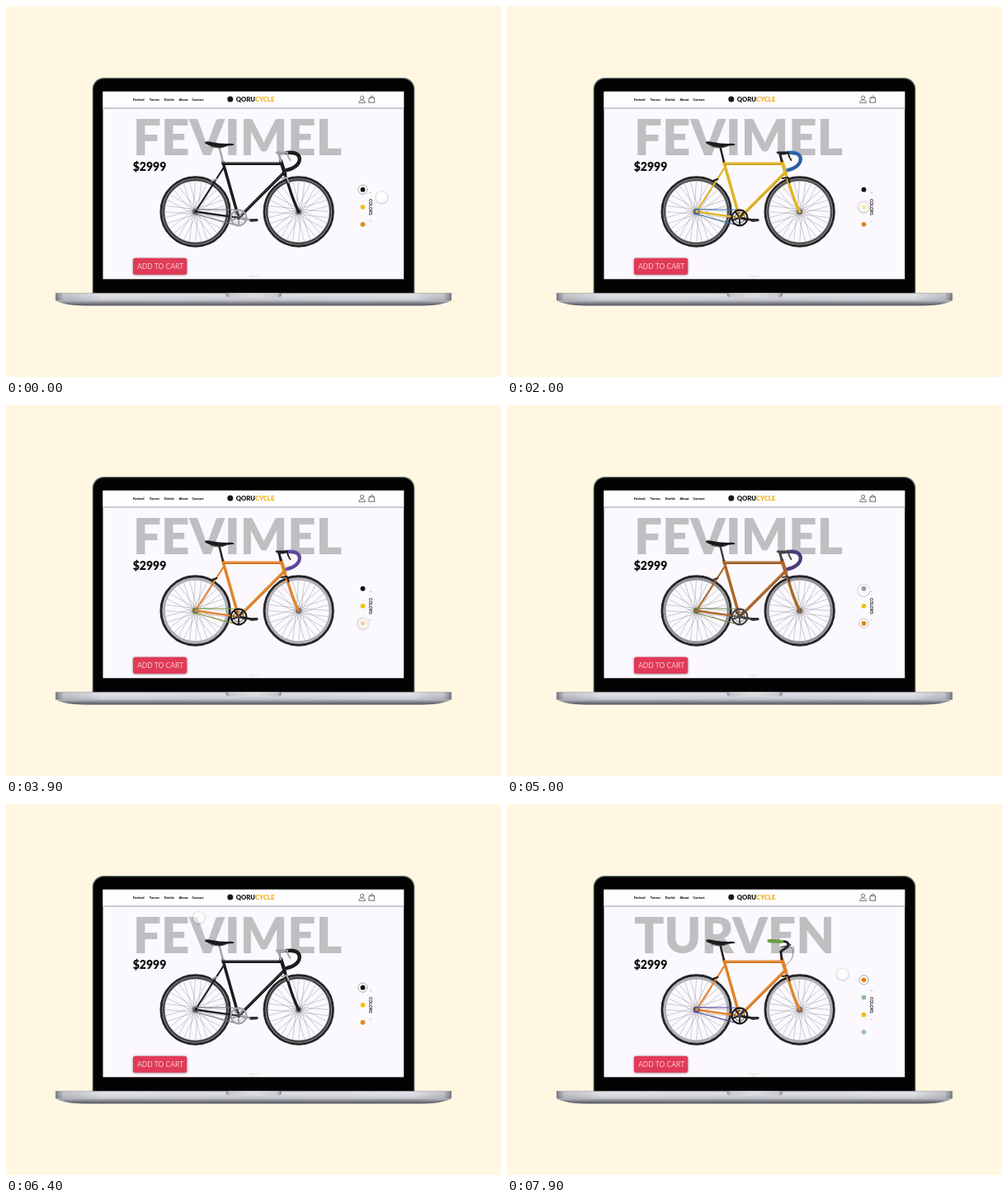
An HTML page with a canvas that plays this animation: 600x450 px, repeating every 8000 ms.

```html
<!DOCTYPE html>
<html lang="en">
<head>
<meta charset="utf-8">
<title>Bike shop</title>
<style>
  html, body { margin: 0; width: 100%; height: 100%; overflow: hidden; background: #fff7e1; }
  canvas { display: block; width: 600px; height: 450px; }
</style>
</head>
<body>
<canvas id="stage"></canvas>
<script>
const W = 600, H = 450, LOOP = 8000, TAU = Math.PI * 2;
const SCALE = Math.max(1, window.devicePixelRatio || 1);
const FONT = 'Lato, sans-serif';

function prepare(canvas) {
  canvas.width = W * SCALE;
  canvas.height = H * SCALE;
  const c = canvas.getContext('2d');
  c.scale(SCALE, SCALE);
  c.lineCap = c.lineJoin = 'round';
  return c;
}
const ctx = prepare(document.getElementById('stage'));

const FEVIMEL_DOTS = [['#111', 222.7], ['#f2c114', 243.8], ['#df8a20', 264.8]];
const TURVEN_DOTS = [['#ee7f1c', 213.3], ['#91bd9b', 234.6], ['#e9c02c', 255.7], ['#93bfd6', 276.6]];
const pages = [
  { title: 'FEVIMEL', dots: FEVIMEL_DOTS, pick: 0, frame: '#1c1c1f', tape: '#1c1c1f', chain: '#77777b', metal: '#a2a2a6', rim: '#3a3a3d' },
  { title: 'FEVIMEL', dots: FEVIMEL_DOTS, pick: 1, frame: '#e2b423', tape: '#3a7fd0', chain: '#3d70ae', metal: '#1f1f21', rim: '#4a4a4d' },
  { title: 'FEVIMEL', dots: FEVIMEL_DOTS, pick: 2, frame: '#e4832a', tape: '#7a5fbd', chain: '#7f9638', metal: '#1f1f21', rim: '#b4b4b8' },
  { title: 'TURVEN', dots: TURVEN_DOTS, pick: 0, frame: '#e4832a', tape: '#78a848', chain: '#514a9a', metal: '#1f1f21', rim: '#b4b4b8', flat: true }
];

function text(c, str, x, y, size, weight, color) {
  c.font = `${weight} ${size}px ${FONT}`;
  c.fillStyle = color;
  c.fillText(str, x, y);
}
function line(c, color, width, ...p) {
  c.strokeStyle = color;
  c.lineWidth = width;
  c.beginPath();
  c.moveTo(p[0], p[1]);
  for (let i = 2; i < p.length; i += 2) c.lineTo(p[i], p[i + 1]);
  c.stroke();
}
function path(c, color, width, d) {
  c.strokeStyle = color;
  c.lineWidth = width;
  c.stroke(new Path2D(d));
}
function disc(c, x, y, r, color) {
  c.fillStyle = color;
  c.beginPath();
  c.arc(x, y, r, 0, TAU);
  c.fill();
}
function ring(c, x, y, r, color, width) {
  c.strokeStyle = color;
  c.lineWidth = width;
  c.beginPath();
  c.arc(x, y, r, 0, TAU);
  c.stroke();
}
function box(c, x, y, w, h, r, color) {
  c.fillStyle = color;
  c.beginPath();
  c.roundRect(x, y, w, h, r);
  c.fill();
}
function gradient(c, x0, y0, x1, y1, ...stops) {
  const g = c.createLinearGradient(x0, y0, x1, y1);
  stops.forEach(([at, color]) => g.addColorStop(at, color));
  return g;
}

function laptop(c) {
  c.fillStyle = '#fff7e1';
  c.fillRect(0, 0, W, H);
  box(c, 104.7, 87, 390.6, 264, [14, 14, 2, 2], '#5f6f66');
  box(c, 105.8, 88.2, 388.4, 263, [13, 13, 2, 2], '#030303');

  c.fillStyle = gradient(c, 0, 348, 0, 363.7, [0, '#d6d7dc'], [.2, '#d9dadf'], [.5, '#c6c7ce'], [.64, '#aeb0b8'], [.76, '#858791'], [.92, '#62646e'], [1, '#555761']);
  c.fill(new Path2D('M60 348.2H540V357Q530 363 505 363.6H95Q70 363 60 357Z'));
  c.fillStyle = gradient(c, 60, 0, 540, 0, [0, 'rgba(70,72,82,.65)'], [.02, 'rgba(70,72,82,.15)'], [.12, 'rgba(255,255,255,.2)'],
    [.5, 'rgba(255,255,255,.05)'], [.9, 'rgba(255,255,255,.2)'], [.98, 'rgba(70,72,82,.15)'], [1, 'rgba(70,72,82,.65)']);
  c.fillRect(60, 348.2, 480, 9);
  line(c, '#8a8c94', .5, 60, 348.3, 540, 348.3);
  box(c, 266.5, 348.3, 67.5, 5.2, [0, 0, 4, 4],
    gradient(c, 266, 0, 334, 0, [0, '#85868e'], [.08, '#c9c9cf'], [.5, '#dedee2'], [.92, '#c9c9cf'], [1, '#85868e']));
}

function header(c) {
  c.fillStyle = '#fefdff';
  c.fillRect(117.5, 103.8, 364.7, 19.7);
  c.fillStyle = gradient(c, 0, 123.3, 0, 125.3, [0, '#b4b3b7'], [.5, '#bdbcc0'], [1, '#fbf9fd']);
  c.fillRect(117.5, 123.3, 364.7, 2);
  [['Fevimel', 154], ['Turven', 173.7], ['Dorlak', 191.8], ['About', 209.6], ['Contact', 225.6]]
    .forEach(([label, x]) => text(c, label, x, 114.6, 3.9, 900, '#111'));

  disc(c, 271.8, 113, 3.5, '#17171a');
  text(c, 'QORU', 278.7, 116.2, 7.7, 900, '#111');
  text(c, 'CYCLE', 278.7 + c.measureText('QORU').width, 116.2, 7.7, 900, '#f0ae1c');

  ring(c, 431.6, 111.2, 2.1, '#444', .7);
  path(c, '#444', .7, 'M427.7 117C427.7 112.8 435.5 112.8 435.5 117Z');
  path(c, '#444', .8, 'M440.6 111.3H446.3L446.8 117.1H440.1ZM441.8 111.2C441.8 108.3 445.1 108.3 445.1 111.2');
}

function wheel(c, x, y, rim) {
  for (let i = 0; i < 32; i++) {
    const a = i * TAU / 32, hub = a + (i % 2 ? 1.3 : -1.3);
    line(c, 'rgba(85,85,92,.68)', .42, x + 3 * Math.cos(hub), y + 3 * Math.sin(hub), x + 37 * Math.cos(a), y + 37 * Math.sin(a));
  }
  ring(c, x, y, 38.7, rim, 2.5);
  ring(c, x, y, 40, '#a9a9ad', .6);
  ring(c, x, y, 41.7, '#252527', 2.9);
  ring(c, x, y, 37.4, '#77777b', .5);
  disc(c, x, y, 3, '#55555a');
  disc(c, x, y, 1.3, '#c6c6ca');
}

function handlebar(c, b) {
  if (b.flat) {
    path(c, '#1f1f21', 2.8, 'M333 188L331.8 179L341 172.5L340 168Q336 166 332 167');
    line(c, b.tape, 4.2, 317.5, 166, 333, 166.9);
    for (let x = 318; x < 333; x += 2.5) line(c, '#3f6f27', .5, x, 164.4, x + .7, 168.3);
    path(c, '#2a2a2c', 1.1, 'M340 168L344 171L332 173.5');
    path(c, '#555', .7, 'M341 172C350 174 349 189 337 196');
    return;
  }
  path(c, b.metal, 3, 'M333 188L330.8 179L342 178.2');
  path(c, b.tape, 4.4, 'M340 178C349 176.8 355.6 179 355.8 185.5C356 192.5 347.5 198.2 340.2 199');
  if (b.tape !== b.frame) {
    c.setLineDash([.7, 2]);
    path(c, 'rgba(20,20,50,.3)', 3.6, 'M344 178C350 178 355.6 180 355.8 185.5C356 192.5 347.5 198.2 340.2 199');
    c.setLineDash([]);
  }
  path(c, b.metal, 1.9, 'M341 179Q341.5 183 344.5 187');
  line(c, b.metal, 2.4, 328, 177.8, 341, 177.8);
}

function tube(c, color, width, ...p) {
  line(c, color, width, ...p);
  line(c, 'rgba(0,0,0,.2)', width * .25, ...p.map((v, i) => i % 2 ? v + width * .32 : v));
  line(c, 'rgba(255,255,255,.25)', width * .2, ...p.map((v, i) => i % 2 ? v - width * .2 : v));
}

function bike(c, b) {
  const rx = 229.6, fx = 354.7, y = 249.5, cx = 282, cy = 256.9;
  wheel(c, rx, y, b.rim);
  wheel(c, fx, y, b.rim);

  line(c, b.frame, 2.1, 264.5, 195, rx, y);
  line(c, b.frame, 2.3, rx, y, cx, cy);
  path(c, b.frame, 3.3, 'M337.8 204C343 216 344 227 354.7 249.5');
  tube(c, b.frame, 3.6, 336, 203, cx, cy);
  line(c, b.frame, 3.5, 262.8, 189, cx, cy);
  tube(c, b.frame, 3.5, 263.2, 191.2, 333, 191.2);
  line(c, b.frame, 4.3, 333.2, 188, 338.2, 204);

  line(c, b.metal, 2.5, 258.7, 172, 262.8, 188.5);
  c.fillStyle = '#1c1c1f';
  c.fill(new Path2D('M241 165.3Q242.5 163.6 249 165Q260 167.3 272 166.8Q277 167 276.4 168.7Q268 169 260 172.2Q249 170.8 241.8 167Z'));
  path(c, '#4a4a4d', .9, 'M248 170.3Q258 174 267 170');

  path(c, b.metal, 2, 'M334 209L340.5 208L342.5 214M249.5 212L255.5 210');

  path(c, b.chain, 1.1, `M${rx} 246.5L${cx} 247.2M${rx} 252.5L${cx} 266.6`);
  ring(c, rx, y, 3.3, b.chain, 1.1);
  ring(c, cx, cy, 9.4, b.metal, 2.3);
  ring(c, cx, cy, 6.2, b.metal, .8);
  for (let i = 0; i < 5; i++) {
    const a = i * TAU / 5 + .3;
    line(c, b.metal, 1.9, cx, cy, cx + 8.8 * Math.cos(a), cy + 8.8 * Math.sin(a));
  }
  line(c, b.metal, 2.8, cx, cy, 300, 260.2);
  disc(c, cx, cy, 2.3, '#4b4b50');
  line(c, '#2b2b2e', 3.4, 297, 260, 304, 259.6);
  handlebar(c, b);
}

function swatches(c, page) {
  page.dots.forEach(([color, y], i) => {
    if (i === page.pick) {
      disc(c, 432.5, y, 6, '#fff');
      ring(c, 432.5, y, 5.6, '#8f8f92', .8);
    }
    disc(c, 432.5, y, 2.9, color);
  });
  c.save();
  c.translate(439.8, 234);
  c.rotate(Math.PI / 2);
  text(c, 'COLORS', 0, 0, 5, 700, '#222');
  c.restore();
  line(c, '#999', .6, 441.2, 226.5, 442.9, 226.5);
  line(c, '#999', .6, 441.2, 261, 442.9, 261);
}

function render(page) {
  const canvas = document.createElement('canvas');
  const c = prepare(canvas);
  laptop(c);
  c.fillStyle = '#fbf9fd';
  c.fillRect(117.5, 103.8, 364.7, 227.5);
  header(c);
  text(c, page.title, 154, 180.8, 60, 900, '#bfbec1');
  text(c, '$2999', 153.7, 200.3, 14, 900, '#0b0b0c');
  bike(c, page);
  swatches(c, page);

  c.shadowColor = 'rgba(60,20,30,.55)';
  c.shadowBlur = 3 * SCALE;
  c.shadowOffsetY = .4 * SCALE;
  box(c, 154, 305.8, 65.2, 20, 2.5, '#e03a57');
  c.shadowColor = 'transparent';
  text(c, 'ADD TO CART', 159, 318.8, 8.5, 400, '#f8c9d1');

  path(c, '#d2d0d5', .6, 'M294 327.5H305M297.5 329L299.5 330.5L301.5 329');
  return canvas;
}

// Cursor moves: start, end, destination
const moves = [
  [50, 700, 432.5, 243.7],
  [2250, 3000, 432.8, 265],
  [4050, 4800, 432.3, 224.7],
  [5900, 6700, 181.3, 115],
  [7450, 8000, 412.2, 208.7]
];
// Page dissolves: start, page index
const fades = [[1500, 1], [3150, 2], [4950, 0], [7200, 3]];
const FADE = 500;

const clamp = v => Math.min(1, Math.max(0, v));
const easeInOut = p => p < .5 ? 4 * p ** 3 : 1 - 4 * (1 - p) ** 3;
const easeOut = p => 1 - (1 - p) ** 3;

function drawCursor(t) {
  let x = 455.5, y = 232;
  for (const [from, to, tx, ty] of moves) {
    const p = easeInOut(clamp((t - from) / (to - from)));
    x += (tx - x) * p;
    y += (ty - y) * p;
  }
  const g = ctx.createRadialGradient(x, y + .4, 6.2, x, y + .4, 9);
  g.addColorStop(0, 'rgba(50,50,55,.26)');
  g.addColorStop(.4, 'rgba(50,50,55,.12)');
  g.addColorStop(1, 'rgba(50,50,55,0)');
  ctx.fillStyle = g;
  ctx.beginPath();
  ctx.arc(x, y, 9.5, 0, TAU);
  ctx.arc(x, y, 6.8, 0, TAU, true);
  ctx.fill();
  disc(ctx, x, y, 6.8, 'rgba(255,255,255,.58)');
}

function draw(t, views) {
  ctx.globalAlpha = 1;
  ctx.drawImage(views[0], 0, 0, W, H);
  for (const [start, index] of fades) {
    ctx.globalAlpha = easeOut(clamp((t - start) / FADE));
    if (ctx.globalAlpha > 0) ctx.drawImage(views[index], 0, 0, W, H);
  }
  ctx.globalAlpha = 1;
  drawCursor(t);
}

const views = pages.map(render);
const began = performance.now();
function tick() {
  draw((performance.now() - began) % LOOP, views);
  requestAnimationFrame(tick);
}
tick();
</script>
</body>
</html>
```
